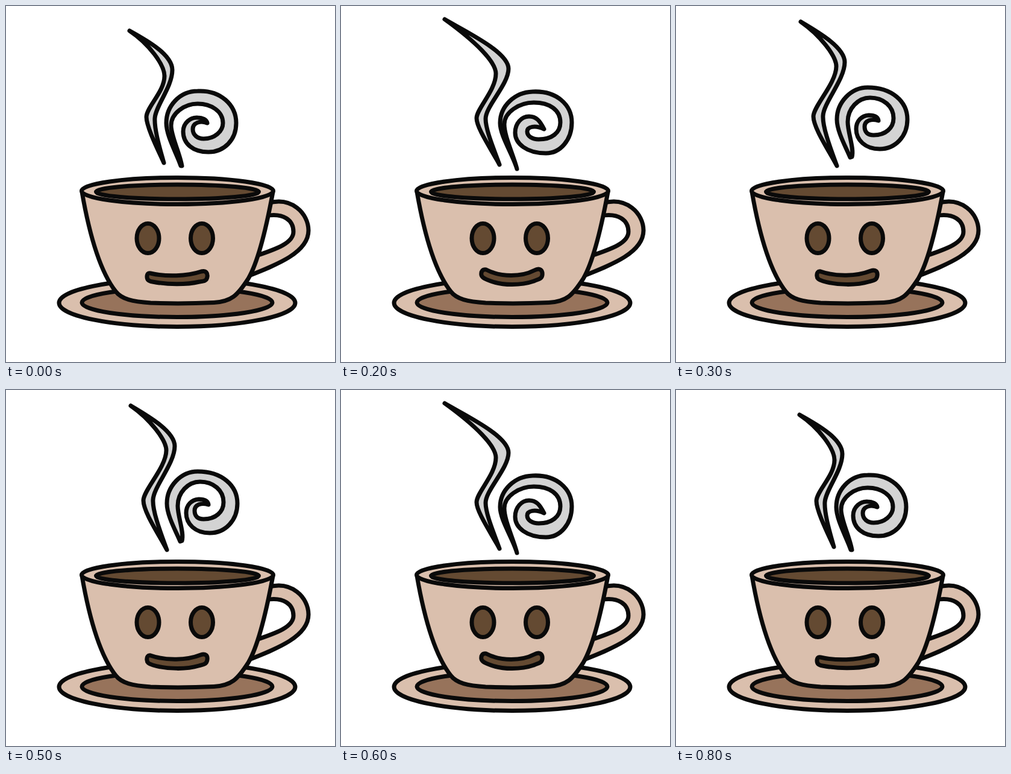
Recreate the animation shown at these times as an HTML page. Size 546 by 590 pixels, loop 900 ms.

```html
<!DOCTYPE html>
<html lang="en">
<head>
<meta charset="utf-8">
<title>Smiling coffee cup</title>
<style>
  html, body { margin: 0; width: 100%; height: 100%; overflow: hidden; background: #fff; }
  svg { display: block; width: 100%; height: 100%; }
  .ink { stroke: #0a0a0a; stroke-width: 7; stroke-linejoin: round; stroke-linecap: round; }
  .clay { fill: #dabfad; }
  .shade { fill: #97735b; }
  .coffee { fill: #644a32; }
  .steam { fill: #d3d3d3; }
</style>
</head>
<body>
<svg viewBox="0 0 546 590">
  <g class="ink">
    <ellipse class="clay" cx="284" cy="492" rx="196" ry="39.5"/>
    <ellipse class="shade" cx="284" cy="491.5" rx="158" ry="24"/>
    <path class="clay" d="M434 327C474 315 502 344 502 372C502 408 452 428 398 449L412 415C452 402 477 392 477 374C477 356 462 342 430 348Z"/>
    <path class="clay" d="M126 308C134 354 150 432 182 473C192 486 210 490 240 492Q290 494 345 491.5C374 490 384 480 402 452C422 418 436 346 443 308Z"/>
    <ellipse class="clay" cx="284.5" cy="306.500" rx="159" ry="22"/>
    <ellipse class="coffee" cx="284.5" cy="308" rx="135" ry="12"/>
    <ellipse class="coffee" cx="235.5" cy="385" rx="18.5" ry="24.5"/>
    <ellipse class="coffee" cx="325" cy="385" rx="18.5" ry="24.5"/>
    <path class="coffee" id="mouth"/>
    <path class="steam" id="wisp"/>
    <path class="steam" id="swirl"/>
  </g>
</svg>
<script>
const STEP = 100;
const STEPS = 9;

const calm = {
  mouth: 'M240 443C266 449 300 448 324 440C332 438 335 443 334 449C333 456 328 456 321 457C300 462 268 462 243 457C236 456 234 453 234 449C234 444 236 442 240 443Z',
  wisp: 'M205 41C232 56 276 80 276 106C276 134 248 166 247 186C246 206 256 238 262 260C252 238 233 200 233 184C233 168 263 142 263 116C263 98 238 63 205 41Z',
  swirl: 'M290 265C283 244 266 215 266 194C266 166 288 141 318 141C356 139 382 164 382 194C382 222 362 242 336 242C310 242 294 228 294 208C294 194 306 184 318 185C326 185 333 188 334 194C322 189 310 194 310 204C310 214 318 220 328 220C346 220 360 208 360 194C360 174 340 162 318 162C296 162 274 178 274 198C274 216 288 242 292 265Z'
};
const pleased = {
  mouth: 'M240 440C266 449 300 448 323 439C331 436 335 440 334 447C333 455 327 455 320 457C300 463 268 463 244 456C237 454 234 452 234 448C233 442 236 439 240 440Z',
  wisp: 'M207 26C234 42 280 68 280 93C280 122 245 160 244 182C243 202 258 240 267 265C254 240 228 202 228 183C228 166 266 128 266 100C266 83 239 48 207 26Z',
  swirl: 'M289 251C282 234 267 208 267 188C267 160 290 135 318 135C358 135 384 158 384 188C384 216 364 237 338 237C314 237 299 222 299 204C299 190 308 182 320 181C328 181 335 183 336 190C324 186 313 190 313 200C313 209 318 214 328 214C348 214 361 202 361 186C361 166 344 152 322 152C302 152 285 170 285 192C285 210 296 236 292 250Z'
};
const happy = {
  mouth: 'M241 437C266 450 300 449 321 438C330 433 335 438 334 446C333 453 326 453 320 456C300 463 268 464 246 455C238 452 234 450 233 446C232 440 235 436 241 437Z',
  wisp: 'M172 22C206 42 278 76 278 104C278 130 240 166 240 187C240 206 255 240 263 263C249 237 225 202 225 186C225 170 257 140 257 112C257 92 222 58 172 22Z',
  swirl: 'M292 270C285 246 264 215 264 194C264 166 288 143 318 142C358 140 383 164 383 193C383 222 364 244 340 244C308 244 289 228 289 210C289 194 300 183 312 183C324 183 330 190 337 204C322 197 309 200 309 208C309 216 318 221 328 221C350 221 364 210 364 193C364 172 346 160 320 160C296 160 271 176 271 196C271 216 286 246 292 270Z'
};

// The face swings calm, pleased, happy, pleased twice per loop and ends on calm.
const swing = [calm, pleased, happy, pleased];

function draw() {
  const step = Math.floor(performance.now() / STEP) % STEPS;
  const pose = swing[step % swing.length];
  for (const part in pose) {
    document.getElementById(part).setAttribute('d', pose[part]);
  }
  requestAnimationFrame(draw);
}
draw();
</script>
</body>
</html>
```
